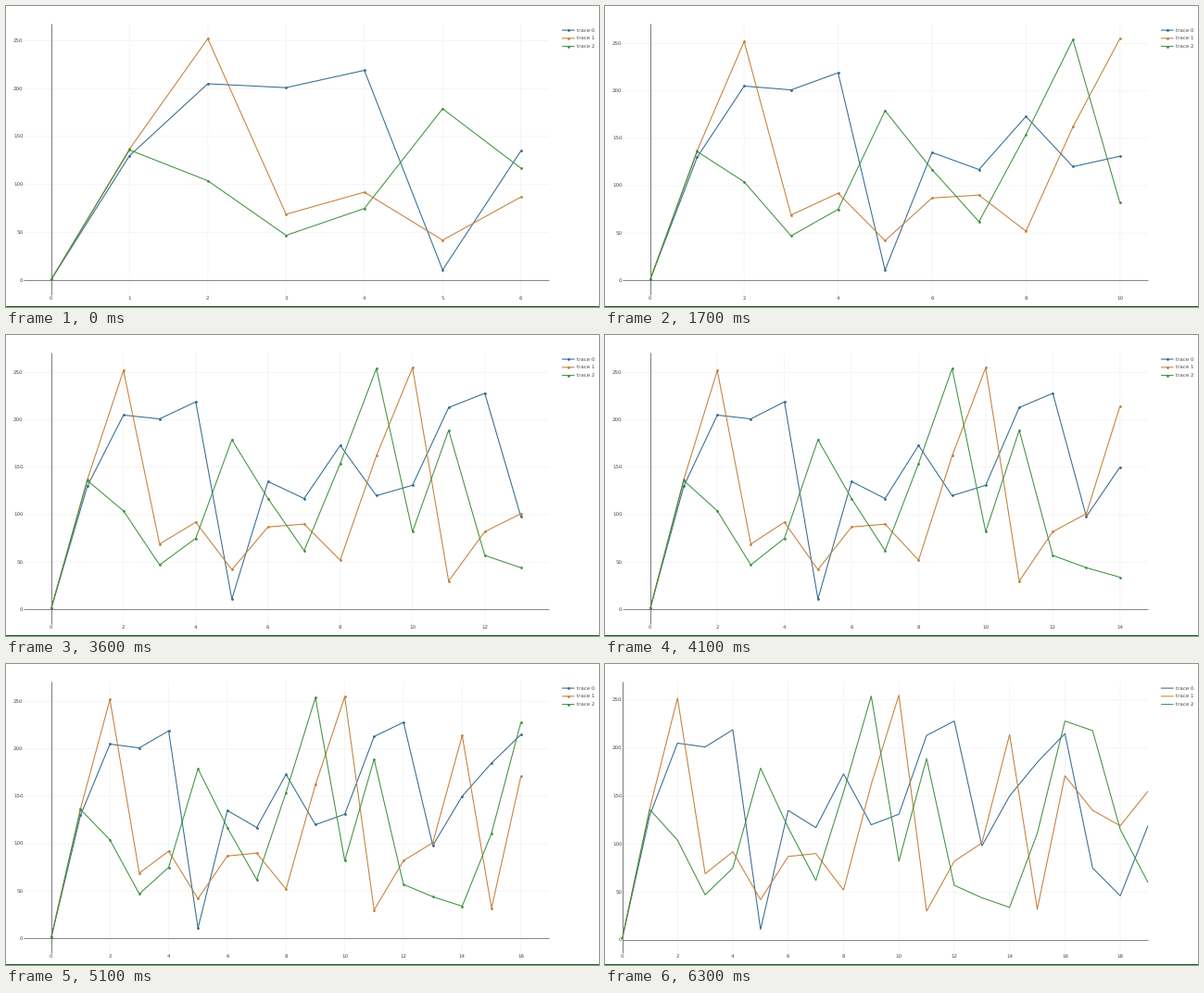
Write a matplotlib script that moves like this. It is 640 px wide and 325 px high and loops after 6.4 s.

```python
import math

import matplotlib.pyplot as plt
from matplotlib.animation import ArtistAnimation
from matplotlib.patches import Rectangle

W, H, DPI = 640, 325, 100
PX = 72 / DPI                       # points per pixel
STEP_MS, FRAMES = 100, 64

# Plot area and the padding kept around the data
LEFT, RIGHT, TOP, BOTTOM = 18.5, 586, 19, 311.6
PAD_X, PAD_Y, PAD_Y_LINES = 30.3, 16.3, 14.6
MARKER_LIMIT = 20                   # from this many points on: lines only

TRACES = [
    ("trace 0", "#336b92",
     [1, 130, 205, 201, 219, 11, 135, 117, 173, 120,
      131, 213, 228, 98, 150, 185, 215, 75, 46, 119]),
    ("trace 1", "#c67f38",
     [1, 137, 252, 69, 92, 42, 87, 90, 52, 162,
      255, 30, 82, 101, 214, 32, 171, 135, 119, 155]),
    ("trace 2", "#3f9241",
     [1, 136, 104, 47, 75, 179, 117, 62, 154, 254,
      82, 189, 57, 44, 34, 111, 228, 218, 115, 60]),
]

plt.rcParams["font.family"] = "DejaVu Sans"
plt.rcParams["text.hinting"] = "none"

fig = plt.figure(figsize=(W / DPI, H / DPI), dpi=DPI, facecolor="white")
ax = fig.add_axes([0, 0, 1, 1])
ax.set_xlim(0, W)
ax.set_ylim(H, 0)
ax.axis("off")


def line(xs, ys, color, width=1.0, z=2, marker=False, snap=False):
    art, = ax.plot(xs, ys, color=color, lw=width * PX, zorder=z,
                   marker="o" if marker else None, ms=2.8 * PX, mew=0,
                   solid_capstyle="butt", solid_joinstyle="round")
    art.set_snap(snap)
    return art


def label(x, y, text, ha):
    return ax.text(x, y, text, size=5.5 * PX, color="#444444",
                   ha=ha, va="center", zorder=6)


def tick_step(span, count=10):
    """Smallest 1-2-5 step that gives at most `count` intervals."""
    rough = span / count
    base = 10 ** math.floor(math.log10(rough))
    return base * next(m for m in (1, 2, 5, 10) if m * base >= rough)


def ticks(low, high):
    step = tick_step(high - low)
    first = math.ceil(low / step - 1e-9)
    last = math.floor(high / step + 1e-9)
    return [round(i * step) for i in range(first, last + 1)]


def axis_map(v0, v1, p0, p1):
    """Value to pixel, and pixel to value."""
    k = (p1 - p0) / (v1 - v0)
    return (lambda v: p0 + (v - v0) * k), (lambda p: v0 + (p - p0) / k)


def chart(n):
    """All artists of the chart showing the first n points."""
    marked = n < MARKER_LIMIT
    pad_x = PAD_X if marked else 0
    pad_y = PAD_Y if marked else PAD_Y_LINES
    shown = [v for _, _, data in TRACES for v in data[:n]]
    px, x_at = axis_map(0, n - 1, LEFT + pad_x, RIGHT - pad_x)
    py, y_at = axis_map(min(shown), max(shown), BOTTOM - pad_y, TOP + pad_y)

    arts = []
    for v in ticks(x_at(LEFT), x_at(RIGHT)):
        x = px(v)
        arts.append(label(x, 316, str(v), "center"))
        if v:
            arts.append(line([x, x], [TOP, BOTTOM], "#f4f4f4", 0.9, 1))
    for v in ticks(y_at(BOTTOM), y_at(TOP)):
        y = py(v)
        arts.append(label(18.4, y, str(v), "right"))
        if v:
            arts.append(line([LEFT, RIGHT], [y, y], "#f4f4f4", 0.9, 1))

    arts.append(line([LEFT, RIGHT], [py(0)] * 2, "#8b888d", snap=True))
    arts.append(line([px(0)] * 2, [TOP, BOTTOM], "#7d7a7f", snap=True))

    xs = [px(i) for i in range(n)]
    for i, (_, color, data) in enumerate(TRACES):
        ys = [py(v) for v in data[:n]]
        arts.append(line(xs, ys, color, 1.05, 3 + i / 10, marked))
        y = 26.1 + 8.75 * i
        arts.append(line([600, 613.6], [y, y], color, 1.05))
        if marked:
            arts.append(line([606.8], [y], color, marker=True))
    return arts


for i, (name, _, _) in enumerate(TRACES):
    label(616.2, 26.1 + 8.75 * i, name, "left")
ax.add_patch(Rectangle((0, 323.6), W, 1.4, color="#146414", lw=0, zorder=7))

# Moments at which one more point arrives: steady after an uneven start
arrivals = [200, 800, 1400] + list(range(1700, 6300, 500))


def points_at(ms):
    return 7 + sum(t <= ms for t in arrivals)


charts = {n: chart(n) for n in range(7, 21)}
frames = [charts[points_at(i * STEP_MS)] for i in range(FRAMES)]

anim = ArtistAnimation(fig, frames, interval=STEP_MS, repeat=True,
                       repeat_delay=0, blit=False)
plt.show()
```
